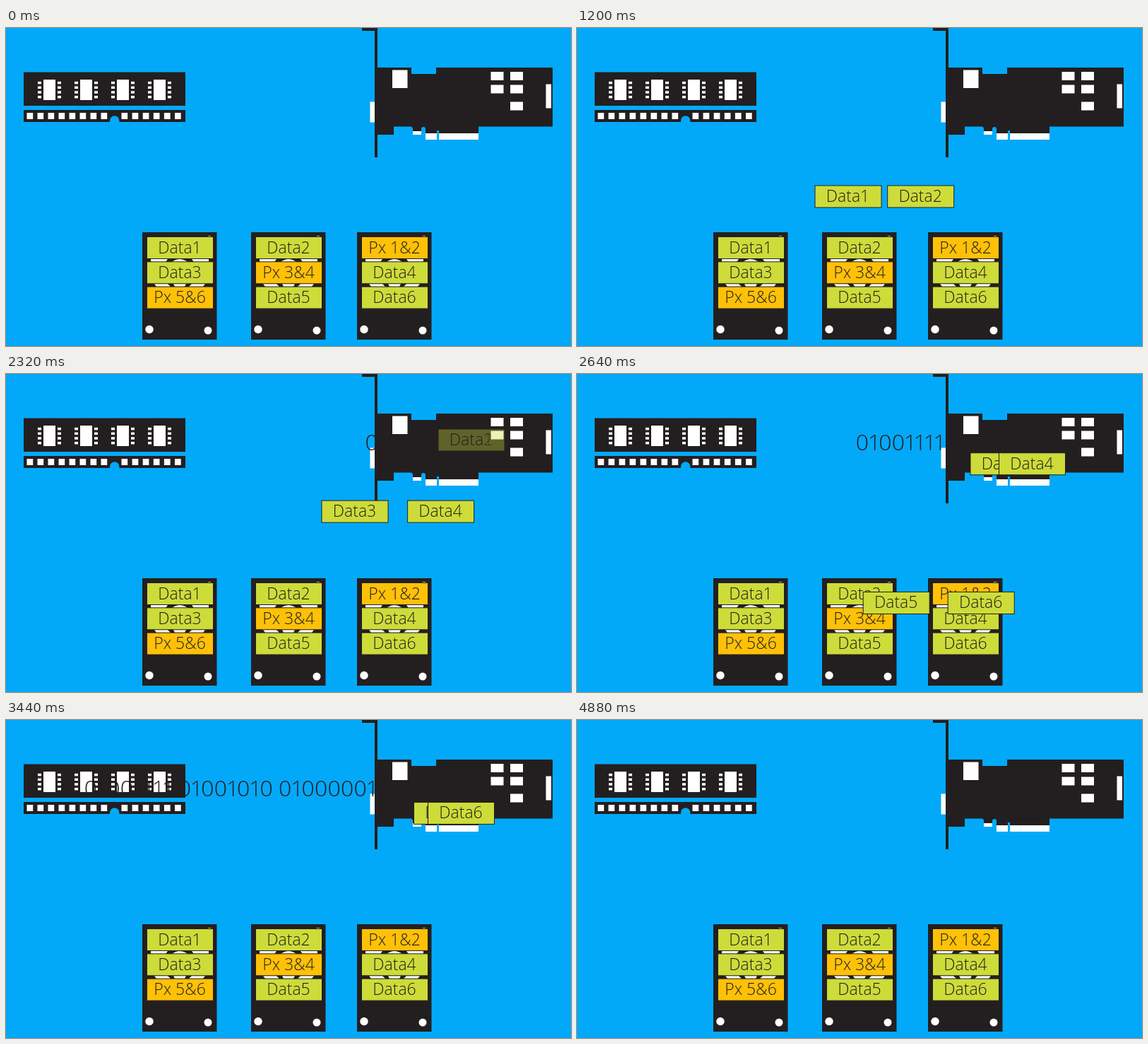
Recreate the animation shown at these times as an HTML page. Size 800 by 450 pixels, loop 10000 ms.

```html
<!DOCTYPE html>
<html lang="en">
<head>
<meta charset="utf-8">
<title>Parity read</title>
<style>
  html, body { margin: 0; width: 100%; height: 100%; overflow: hidden; background: #03a9f9; }
  svg { display: block; width: 100vw; height: 100vh; }
  text { font-family: "Open Sans", "Noto Sans", sans-serif; font-weight: 300; fill: #231f20; }
  .label { font-size: 23px; text-anchor: middle; }
  .bits { font-size: 32px; }
</style>
</head>
<body>
<svg id="stage" viewBox="0 0 800 450"></svg>
<script>
const NS = "http://www.w3.org/2000/svg";
const BLUE = "#03a9f9", DARK = "#231f20", LIME = "#cddc39", AMBER = "#ffc107", WHITE = "#fff";
const stage = document.getElementById("stage");

function add(parent, tag, attrs, content) {
  const el = document.createElementNS(NS, tag);
  for (const key in attrs) el.setAttribute(key, attrs[key]);
  if (content) el.textContent = content;
  parent.appendChild(el);
  return el;
}
const group = (parent, x = 0, y = 0) => add(parent, "g", { transform: `translate(${x} ${y})` });
const rect = (parent, x, y, width, height, fill) => add(parent, "rect", { x, y, width, height, fill });
const path = (parent, d, fill) => add(parent, "path", { d, fill });
const clamp = v => Math.min(1, Math.max(0, v));

function block(x, y, label) {
  const g = group(stage, x, y);
  add(g, "rect", { x: .5, y: .5, width: 94, height: 31, stroke: DARK,
    fill: label[0] === "P" ? AMBER : LIME });
  add(g, "text", { x: 47, y: 23.5, class: "label" }, label);
  return g;
}

function drawMemory() {
  rect(stage, 25, 62.5, 229, 47.5, DARK);
  rect(stage, 25, 116, 229, 17, DARK);
  for (let i = 0; i < 4; i++) {
    const x = 53 + i * 52;
    rect(stage, x, 73, 17, 29, WHITE);
    for (let j = 0; j < 4; j++) {
      rect(stage, x - 8, 75.8 + j * 6.7, 5, 3.5, WHITE);
      rect(stage, x + 20, 75.8 + j * 6.7, 5, 3.5, WHITE);
    }
  }
  for (let i = 0; i < 8; i++) rect(stage, 29.5 + i * 15, 120, 8.7, 9, WHITE);
  for (let i = 0; i < 6; i++) rect(stage, 163.5 + i * 15.1, 120, 8.7, 9, WHITE);
  path(stage, "M147 133.5V131A6.7 6.7 0 0 1 160.4 131V133.5Z", BLUE);
}

function drawCard() {
  path(stage, "M504 0H526V183H522V4H504Z", DARK);
  path(stage, "M526 56H574V65H609V56H774V139.5H669V150H594V143Q594 140 591 140T588 143V147" +
    "H576V143Q576 139.5 573 139.5H549V151H526Z", DARK);
  rect(stage, 576, 146, 12, 5, WHITE);
  rect(stage, 594, 149, 16, 9, WHITE);
  rect(stage, 613, 149, 56, 9, WHITE);
  rect(stage, 610, 145, 3, 13, BLUE);
  rect(stage, 547, 59.5, 21.5, 25.5, WHITE);
  rect(stage, 515.5, 104.5, 6.5, 29, WHITE);
  rect(stage, 764.5, 79.5, 7.5, 34, WHITE);
  for (const [x, y] of [[686.5, 62], [714, 62], [686.5, 80.5], [714, 80.5], [714, 104.5]])
    rect(stage, x, y, 18, 12, WHITE);
}

function drawDisk(x, labels) {
  const g = group(stage, x, 289);
  rect(g, 0, 0, 105.5, 152, DARK);
  path(g, "M92 6Q95 4.5 98 6", WHITE);
  path(g, "M12 38H36L33 42H12Z M42 42Q53 34 64 42Z M70 38H94V42H73Z", WHITE);
  path(g, "M17 73H36L40 77H20Z M44 73H62L60 77H46Z M70 73H89L86 77H66Z", WHITE);
  add(g, "circle", { cx: 10, cy: 137.5, r: 5.7, fill: WHITE });
  add(g, "circle", { cx: 93, cy: 139, r: 5.5, fill: WHITE });
  labels.forEach((label, row) => block(x + 6, 295 + row * 35.3, label));
}

drawMemory();
drawCard();

// Binary stream with proportional digits
const BITS = "01001111 01001010 01000001";
const ADVANCE = { 0: 18.5, 1: 13.9, " ": 8 };
const clip = add(add(stage, "defs"), "clipPath", { id: "wipe" });
const wipe = rect(clip, 0, 60, 0, 60, DARK);
const stream = add(stage, "g", { "clip-path": "url(#wipe)" });
let bitsWidth = 0;
for (const ch of BITS) {
  if (ch !== " ") add(stream, "text", { x: bitsWidth - (ch === "1" ? 1.5 : 0), y: 108, class: "bits" }, ch);
  bitsWidth += ADVANCE[ch];
}

const DISKS = [193, 347, 497];
drawDisk(DISKS[0], ["Data1", "Data3", "Px 5&6"]);
drawDisk(DISKS[1], ["Data2", "Px 3&4", "Data5"]);
drawDisk(DISKS[2], ["Px 1&2", "Data4", "Data6"]);

// Each row sends its two data blocks to the card
const GOAL = { x: 611.5, y: 77.5 };
const movers = [[0, 1], [0, 2], [1, 2]].flatMap((pair, row) => pair.map((disk, i) => {
  const x = DISKS[disk] + 6, y = 295 + row * 35.3;
  return { x, y, start: 800 + row * 800, el: block(x, y, "Data" + (row * 2 + i + 1)) };
}));

function render(t) {
  for (const { x, y, start, el } of movers) {
    const p = clamp((t - start) / 1200);
    const fade = 1 - clamp((t - start - 1200) / 400);
    el.setAttribute("transform", `translate(${x + (GOAL.x - x) * p} ${y + (GOAL.y - y) * p})`);
    el.setAttribute("opacity", fade);
    el.setAttribute("visibility", t >= start && fade > 0 ? "visible" : "hidden");
  }
  const shown = clamp((t - 2000) / 1000) * bitsWidth;
  const erased = clamp((t - 3840) / 1020) * bitsWidth;
  stream.setAttribute("transform", `translate(${Math.max(-14, 622 - .355 * (t - 2000))} 0)`);
  stream.setAttribute("visibility", shown > erased ? "visible" : "hidden");
  wipe.setAttribute("x", erased);
  wipe.setAttribute("width", Math.max(0, shown - erased));
}

const begin = performance.now();
function tick() {
  const t = (performance.now() - begin) % 10000;
  render(Math.floor(t / 40) * 40);
  requestAnimationFrame(tick);
}
tick();
</script>
</body>
</html>
```
